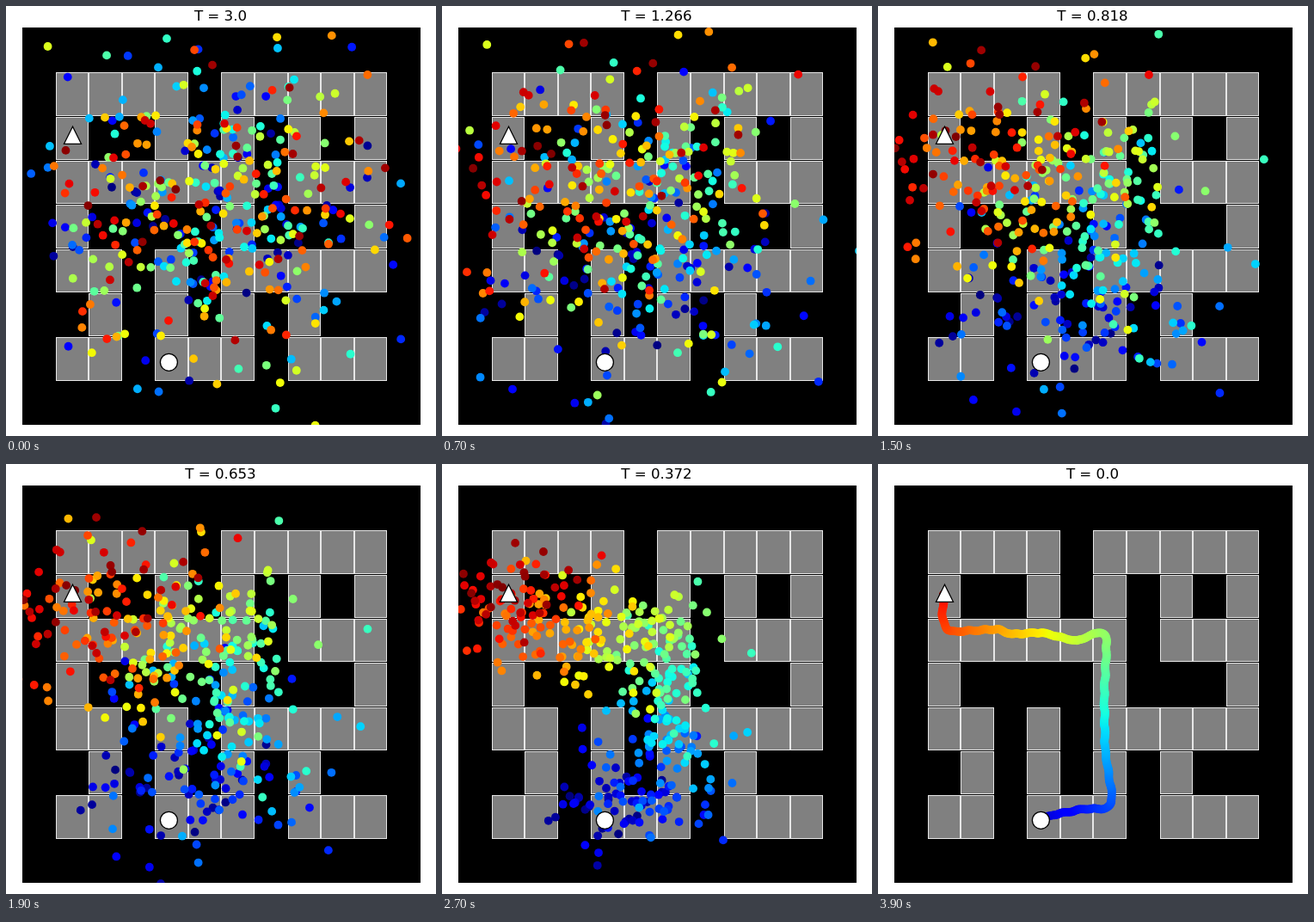
An HTML page for the animation above (4 s loop, 500 by 500 pixels).

```html
<!DOCTYPE html>
<html lang="en">
<head>
<meta charset="utf-8">
<title>Maze path diffusion</title>
<style>
  html, body { margin: 0; width: 100%; height: 100%; overflow: hidden; background: #fff; }
  svg { display: block; width: 500px; height: 500px; }
  text { font: 16.67px "DejaVu Sans", sans-serif; text-anchor: middle; }
</style>
</head>
<body>
<svg viewBox="0 0 500 500">
  <defs>
    <clipPath id="axes"><rect x="19" y="25" width="463" height="462"/></clipPath>
    <path id="route" d="M190 413L204 408L240 401H260Q273 400 272 385L264 332L263 268
      L266 207Q263 190 248 199L231 206L190 196L156 198L138 192L90 195Q74 195 75 170L77 152"/>
  </defs>
  <text id="title" x="249.5" y="17"></text>
  <rect x="19" y="25" width="463" height="462"/>
  <g id="cells" fill="#808080" stroke="#e6e6e6"></g>
  <g id="dots" clip-path="url(#axes)"></g>
  <g fill="#fff" stroke="#000" stroke-width="1.3">
    <circle cx="189.4" cy="414.3" r="10"/>
    <path d="M77.5 140.3L67.5 160.3H87.5Z"/>
  </g>
</svg>
<script>
const STEPS = 40, STEP_MS = 100, COUNT = 384, DOT_R = 4.9;
const CENTER_X = 250, CENTER_Y = 256;

const MAZE = `
####.#####
#..#.#.#.#
######.###
#....#...#
##.#.#####
.#.#.#.#..
##.###.###`.trim().split("\n");

const byId = id => document.getElementById(id);
const clamp = v => Math.max(0, Math.min(1, v));

function add(parent, tag, attrs) {
  const el = document.createElementNS("http://www.w3.org/2000/svg", tag);
  for (const k in attrs) el.setAttribute(k, attrs[k]);
  return parent.appendChild(el);
}

// the trajectory rests briefly at both ends and wobbles a little on the way
const route = byId("route"), routeLength = route.getTotalLength();
function routeAt(u) {
  const p = route.getPointAtLength(clamp((u - .06) / .84) * routeLength);
  return { x: p.x + .6 * Math.sin(u * 173), y: p.y + .6 * Math.cos(u * 211) };
}

function jet(u) {
  const r = Math.min(clamp((u - .35) / .31), 1 - clamp((u - .89) / .11) / 2);
  const g = Math.min(clamp((u - .125) / .25), clamp((.91 - u) / .27));
  const b = Math.min(.5 + clamp(u / .11) / 2, clamp((.65 - u) / .31));
  return `rgb(${[r, g, b].map(v => Math.round(v * 255)).join()})`;
}

let seed = 20;
function random() {
  seed = (seed + 0x6D2B79F5) | 0;
  let t = Math.imul(seed ^ (seed >>> 15), 1 | seed);
  t = (t + Math.imul(t ^ (t >>> 7), 61 | t)) ^ t;
  return ((t ^ (t >>> 14)) >>> 0) / 4294967296;
}
const gauss = () =>
  Math.sqrt(-2 * Math.log(1 - random())) * Math.cos(2 * Math.PI * random());

// probability that |z| < x for a standard normal (Simpson's rule)
function within(x) {
  const n = 60, h = x / n;
  let sum = 0;
  for (let i = 0; i <= n; i++) {
    const w = i === 0 || i === n ? 1 : i % 2 ? 4 : 2;
    sum += w * Math.exp(-((i * h) ** 2) / 2);
  }
  return sum * h / 3 * Math.sqrt(2 / Math.PI);
}

// noise levels follow normal quantiles, starting at 3
function noiseLevel(step) {
  const left = STEPS - 1 - step;
  if (!left) return 0;
  if (!step) return 3;
  let lo = 0, hi = 4;
  for (let i = 0; i < 40; i++) {
    const mid = (lo + hi) / 2;
    if (within(mid) < left * .025765) lo = mid; else hi = mid;
  }
  return lo / 1.07;
}

const snap = v => Math.ceil(v - .5);
const colX = c => snap(19 + c * 463 / 12), rowY = r => snap(25 + r * 462 / 9);
MAZE.forEach((row, r) => [...row].forEach((cell, c) => {
  if (cell !== "#") return;
  const x = colX(c + 1) + .5, y = rowY(r + 1) + 1.5;
  add(byId("cells"), "rect", {
    x, y,
    width: colX(c + 2) - .5 - x,
    height: rowY(r + 2) - .5 - y
  });
}));

const dots = Array.from({ length: COUNT }, (_, i) => {
  const u = i / (COUNT - 1), p = routeAt(u);
  return {
    x: p.x - CENTER_X, y: p.y - CENTER_Y,
    nx: gauss() * 96 - 6, ny: gauss() * 93 - 18,
    el: add(byId("dots"), "circle", { r: DOT_R, fill: jet(u) })
  };
});

function draw(step) {
  const T = noiseLevel(step);
  const keep = Math.exp(-T * T / 2), noise = Math.sqrt(1 - keep * keep);
  const value = Math.round(T * 1000) / 1000;
  byId("title").textContent =
    "T = " + (Number.isInteger(value) ? value.toFixed(1) : value);
  for (const d of dots) {
    d.el.setAttribute("cx", (CENTER_X + keep * d.x + noise * d.nx).toFixed(2));
    d.el.setAttribute("cy", (CENTER_Y + keep * d.y + noise * d.ny).toFixed(2));
  }
}

let shown = -1;
function tick() {
  const step = Math.floor(performance.now() / STEP_MS) % STEPS;
  if (step !== shown) draw(shown = step);
  requestAnimationFrame(tick);
}
tick();
</script>
</body>
</html>
```
